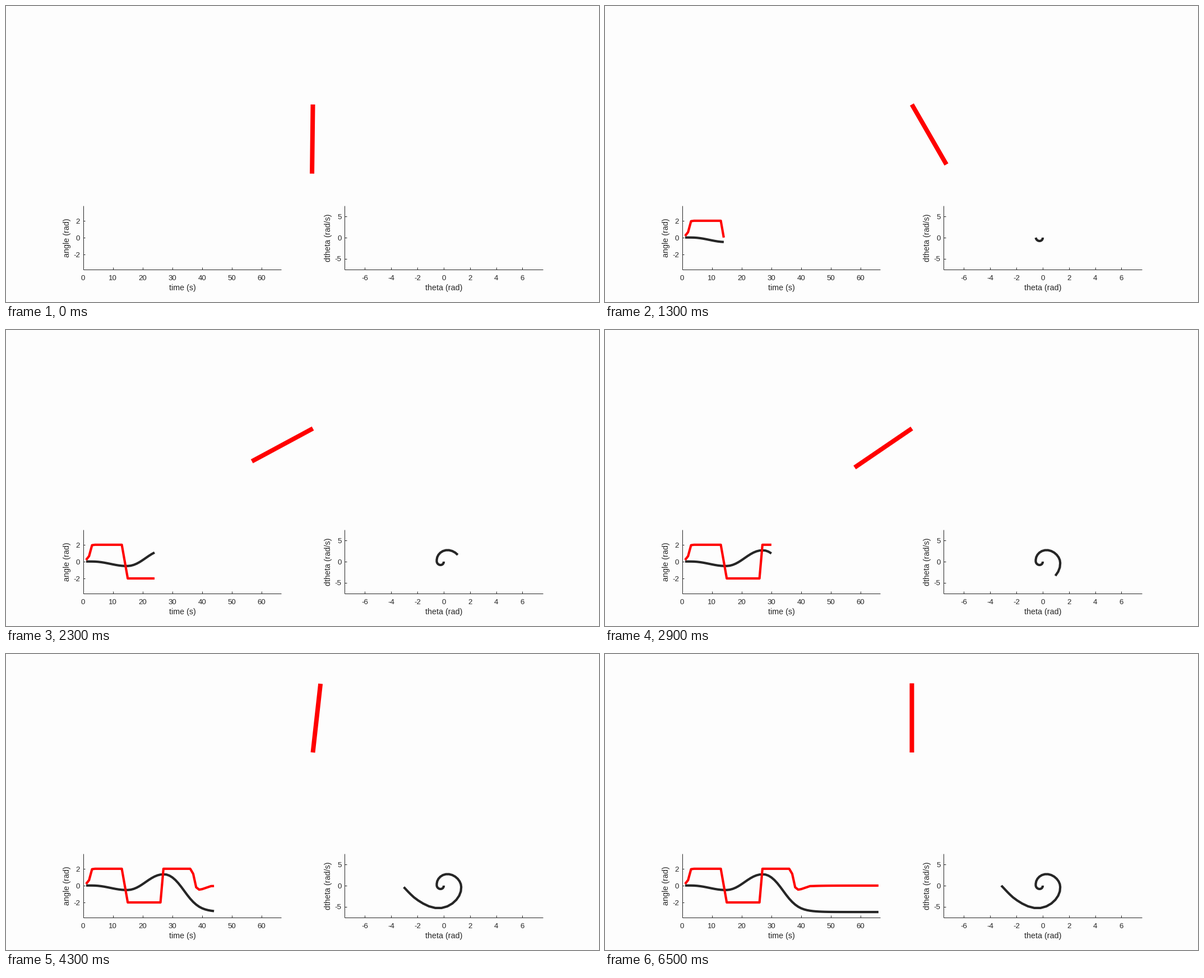
A matplotlib script for the animation above (6.6 s loop, 1058 by 529 pixels).

```python
import numpy as np
import matplotlib.pyplot as plt
from matplotlib.animation import FuncAnimation

W, H, DPI = 1058, 529, 100
PX = 72 / DPI                      # one pixel in points
STEPS, INTERVAL = 66, 100
INK, RED, PAPER = "#262626", "#ff0000", "#fdfdfd"
PIVOT, ROD = (547.5, 176), 123.6

plt.rcParams["font.family"] = "Liberation Sans"


def swing_up():
    """Euler steps of a damped pendulum with limited torque, 0 hangs down."""
    dt, g = 0.09, 9.8
    push = ([0.2, 0.65, 1.95] + [2] * 10 + [0] + [-2] * 12 + [2] * 10
            + [1.4, -0.2, -0.48, -0.42, -0.3, -0.18, -0.06])
    th, om = 0.012, 0.0
    rows = []
    for k in range(STEPS):
        # near the top a linear feedback takes over
        u = push[k] if k < len(push) else 16.2 * (th + np.pi) + 5.1 * om
        rows.append((th, om, u))
        drag = 0.1 if k < 35 else 0.115
        acc = -g * np.sin(th) - u - drag * om
        th, om = th + dt * om, om + dt * acc
    return np.array(rows).T


theta, omega, torque = swing_up()
time = np.arange(1, STEPS + 1)

fig = plt.figure(figsize=(W / DPI, H / DPI), dpi=DPI, facecolor=PAPER)
ax = fig.add_axes([0, 0, 1, 1])
ax.set_xlim(0, W)
ax.set_ylim(H, 0)
ax.axis("off")


def hairline(xs, ys):
    ax.plot(xs, ys, color=INK, lw=PX, solid_capstyle="butt")


def label(x, y, s, size=14.3, **kw):
    opts = dict(ha="center", va="baseline", color=INK, fontsize=size * PX)
    ax.text(x, y, s, **{**opts, **kw})


class Chart:
    top, bottom, width = 357.2, 470.6, 353.5

    def __init__(self, left, xlim, ylim, xticks, yticks, xname, yname):
        self.left, self.xlim, self.ylim = left, xlim, ylim
        right = left + self.width
        hairline([left, left], [self.top, self.bottom])
        hairline([left, right], [self.bottom, self.bottom])
        for v in xticks:
            x = self.x(v)
            hairline([x, x], [self.bottom, self.bottom - 3.5])
            label(x, 489.7, str(v), 13.2)
        for v in yticks:
            y = self.y(v)
            hairline([left, left + 3.5], [y, y])
            label(left - 5.5, y + 4.9, str(v), 13.2, ha="right")
        label(left + self.width / 2 + 0.5, 508, xname)
        label(left - 25, (self.top + self.bottom) / 2, yname,
              rotation=90, rotation_mode="anchor")

    def x(self, v):
        lo, hi = self.xlim
        return self.left + (v - lo) / (hi - lo) * self.width

    def y(self, v):
        lo, hi = self.ylim
        return self.bottom - (v - lo) / (hi - lo) * (self.bottom - self.top)


def trace(color, width=4.2):
    return ax.plot([], [], color=color, lw=width * PX,
                   solid_capstyle="butt", solid_joinstyle="round")[0]


tau = 2.4 * np.pi
history = Chart(137.6, (0, 66.6), (-tau / 2, tau / 2), range(0, 61, 10),
                (-2, 0, 2), "time (s)", "angle (rad)")
phase = Chart(604, (-tau, tau), (-tau, tau), range(-6, 7, 2),
              (-5, 0, 5), "theta (rad)", "dtheta (rad/s)")

angle_line, torque_line, phase_line = trace(INK), trace(RED), trace(INK)
rod = trace(RED, 8)


def draw(i):
    n = i + 1 if i else 0          # a single sample draws no line
    angle_line.set_data(history.x(time[:n]), history.y(theta[:n]))
    torque_line.set_data(history.x(time[:n]), history.y(torque[:n]))
    phase_line.set_data(phase.x(theta[:n]), phase.y(omega[:n]))
    x, y = PIVOT
    rod.set_data([x, x - ROD * np.sin(theta[i])],
                 [y, y + ROD * np.cos(theta[i])])
    return angle_line, torque_line, phase_line, rod


anim = FuncAnimation(fig, draw, frames=STEPS, interval=INTERVAL,
                     repeat=True, repeat_delay=0, blit=False)
plt.show()
```
